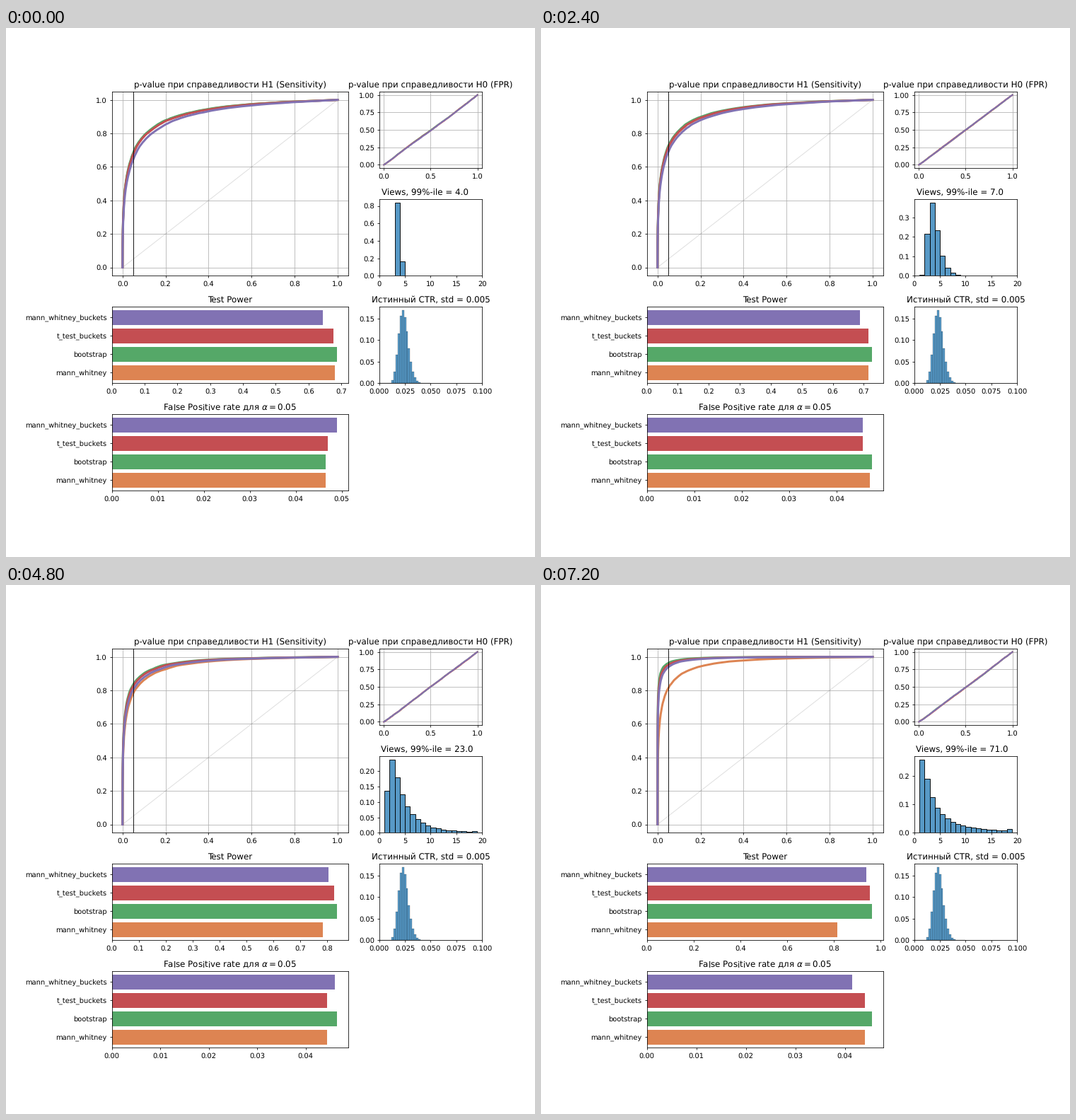
Write a matplotlib script that moves like this. It is 748 px wide and 748 px high and loops after 8 s.

```python
import math

import matplotlib.pyplot as plt
import numpy as np
from matplotlib.animation import FuncAnimation
from matplotlib.gridspec import GridSpec

INCHES = 10.5
DPI = 748 / INCHES
FRAMES = 10
TESTS = ["mann_whitney", "bootstrap", "t_test_buckets", "mann_whitney_buckets"]
COLORS = ["#dd8452", "#55a868", "#c44e52", "#8172b3"]
HIST_FACE = (0x1F / 255, 0x77 / 255, 0xB4 / 255, 0.75)

plt.rcParams["text.hinting"] = "none"

cdf = np.vectorize(lambda z: 0.5 * (1 + math.erf(z / math.sqrt(2))))
Z = np.linspace(7, 0, 500)
ALPHA = 2 * (1 - cdf(Z))
Z_GRID = np.linspace(-4, 4, 1601)
CDF_GRID = cdf(Z_GRID)
T = np.linspace(0, 1, 201)


def view_sigma(i):
    """Spread of the log-views: slow steps first, then wider ones."""
    return round(float(np.interp(i, [0, 4, 9], [0.1, 0.5, 1.4])), 1)


def test_powers(sigma):
    """Power per test: the bootstrap leads, the others trail it by a gap."""
    best = np.interp(sigma, [0.1, 0.5, 0.9, 1.4], [0.687, 0.740, 0.837, 0.963])
    gaps = [0.006 + 0.062 * sigma ** 2.5, 0, 0.011, 0.044 - 0.014 * sigma]
    return best - np.array(gaps)


def false_rates(i, rng):
    """Shared level swinging ever wider in a three-step rhythm, plus jitter."""
    level = 0.048 + 0.001 * i * math.cos(2 * math.pi * (i - 2) / 3)
    return np.round((level + rng.normal(0, 0.0013, len(TESTS))) * 2000) / 2000


def bridge(rng):
    """Sampling error of an empirical CDF on the grid T."""
    draws = np.sort(rng.random(2000))
    return np.searchsorted(draws, T) / 2000 - T


def wobbles(rng, own):
    """One error curve per test, largely shared between the tests."""
    common = bridge(rng)
    return [0.4 * common + own * bridge(rng) for _ in TESTS]


def pin(curve, at, value):
    """Bend an error curve so that it takes the value at one point."""
    gap = value - np.interp(at, T, curve)
    return curve + gap * np.minimum(T / at, (1 - T) / (1 - at))


def power_curve(power, wobble):
    delta = 1.96 + np.interp(power, CDF_GRID, Z_GRID)
    tpr = cdf(delta - Z) + cdf(-delta - Z)
    tpr = tpr + np.interp(tpr, T, pin(wobble, power, 0))
    return np.maximum.accumulate(np.clip(tpr, 0, 1))


def view_shares(sigma):
    """Shares of floor(1 + lognormal) in unit bins, the last one closed."""
    edges = np.log(np.arange(1, 20))
    below = np.append(0, cdf((edges - 1) / sigma))
    shares = np.diff(below)
    shares[17] += shares[18]
    return shares[:18] / below[-1]


def ctr_shares():
    """Gamma-shaped click rates in bins of 0.002."""
    k, scale = 25, 0.0238 / 25
    x = np.linspace(0, 0.05, 2501)[:-1] + 1e-5
    density = np.exp((k - 1) * np.log(x / scale) - x / scale)
    return density.reshape(25, -1).sum(axis=1) / density.sum()


fig = plt.figure(figsize=(INCHES, INCHES), dpi=DPI, facecolor="white")
grid = GridSpec(4, 3, figure=fig, left=0.2, right=0.9, top=0.88, bottom=0.125,
                wspace=0.3, hspace=0.4)
ax_h1 = fig.add_subplot(grid[:2, :2])
ax_h0 = fig.add_subplot(grid[0, 2])
ax_views = fig.add_subplot(grid[1, 2])
ax_ctr = fig.add_subplot(grid[2, 2])
ax_power = fig.add_subplot(grid[2, :2])
ax_fpr = fig.add_subplot(grid[3, :2])


def draw_h1(powers, rng):
    ax_h1.plot([0, 1], [0, 1], color="black", lw=1, alpha=0.13)
    for power, wobble, color in zip(powers, wobbles(rng, 0.1), COLORS):
        ax_h1.plot(ALPHA, power_curve(power, wobble), color=color, lw=3)
    ax_h1.axvline(0.05, color="black", lw=0.9)
    ax_h1.grid(True)
    ax_h1.set_title("p-value при справедливости H1 (Sensitivity)")


def draw_h0(rates, rng):
    for rate, wobble, color in zip(rates, wobbles(rng, 0.3), COLORS):
        ax_h0.plot(T, T + pin(wobble, 0.05, rate - 0.05), color=color, lw=2)
    ax_h0.grid(True)
    ax_h0.set_title("p-value при справедливости H0 (FPR)")


def draw_hist(ax, left, shares, width, x_max, line):
    ax.bar(left, shares, width, align="edge", facecolor=HIST_FACE,
           edgecolor="black", lw=line)
    ax.set_xlim(0, x_max)


def draw_views(sigma):
    draw_hist(ax_views, np.arange(1, 19), view_shares(sigma), 1, 20, 0.9)
    top = f"{math.floor(1 + math.exp(1 + 2.326 * sigma)):.1f}"
    title = ax_views.set_title(f"Views, 99%-ile = {top}")
    # The number sits in a field seven characters wide
    blank = (7 - len(top)) * 0.318 * title.get_fontsize() * DPI / 72
    title.set_x(0.5 - blank / 2 / ax_views.bbox.width)


def draw_ctr():
    draw_hist(ax_ctr, np.arange(25) * 0.002, ctr_shares(), 0.002, 0.1, 0.18)
    ax_ctr.set_title("Истинный CTR, std = 0.005")


def draw_bars(ax, values, title):
    ax.barh(TESTS, values, color=COLORS)
    ax.set_title(title)


def update(i):
    for ax in fig.axes:
        ax.clear()
    rng = np.random.default_rng(40 + i)
    sigma = view_sigma(i)
    powers = test_powers(sigma)
    rates = false_rates(i, rng)
    draw_h1(powers, rng)
    draw_h0(rates, rng)
    draw_views(sigma)
    draw_ctr()
    draw_bars(ax_power, powers, "Test Power")
    draw_bars(ax_fpr, rates, r"False Positive rate для $\alpha = 0.05$")
    return fig.axes


anim = FuncAnimation(fig, update, frames=FRAMES, interval=800,
                     repeat=True, repeat_delay=0, blit=False)
plt.show()
```
